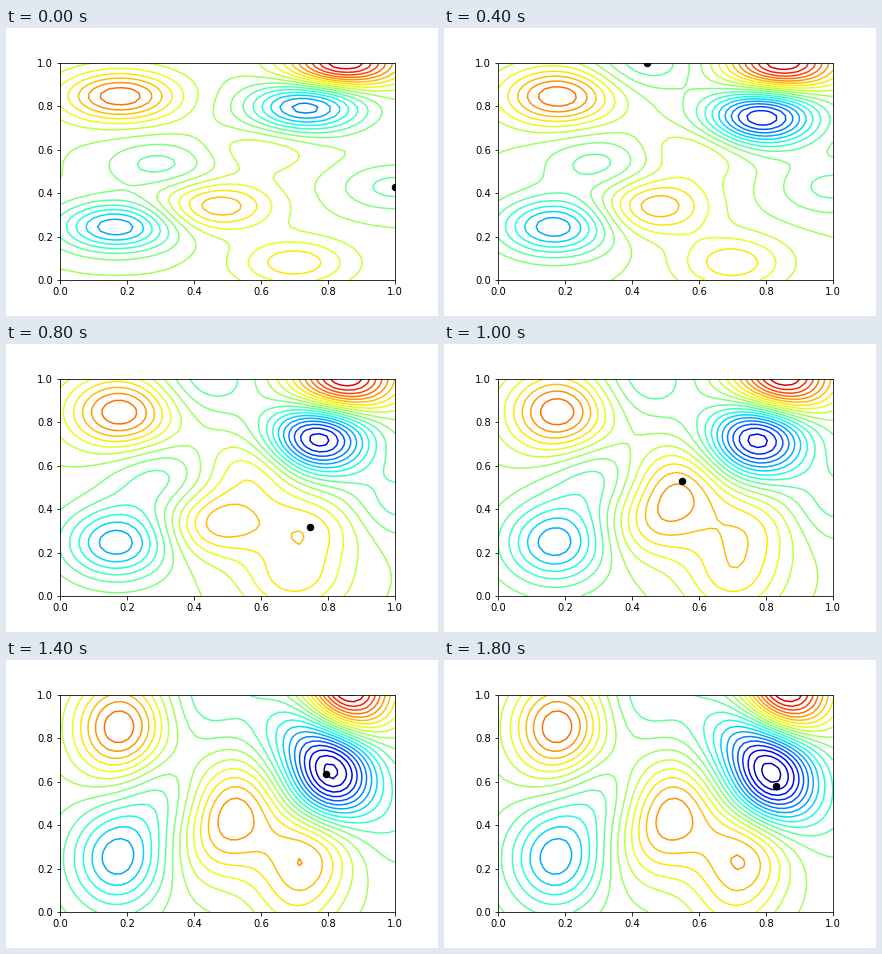
A matplotlib script for the animation above (2000 ms loop, 432x288 px).

```python
import numpy as np
import matplotlib.pyplot as plt
from matplotlib.animation import FuncAnimation

FRAMES, INTERVAL = 10, 200
LEVELS = np.linspace(-10, 10, 25)
NUGGET = 0.01

# known points (x, y, value); one more probe is added at every step
KNOWN = [(0.18, 0.845, 6.55), (0.47, 0.34, 4.7), (0.70, 0.08, 3.95),
         (0.85, 1.00, 9.2), (0.17, 0.245, -4.8), (0.30, 0.53, -1.1),
         (0.735, 0.795, -5.4), (0.60, 0.60, 2.2)]
PROBES = [(1.0, 0.428, -1.15), (0.785, 0.75, -7.4), (0.445, 1.0, -1.4),
          (0.76, 0.71, -7.8), (0.748, 0.317, 4.0), (0.55, 0.53, 4.8),
          (0.327, 0.0, 0.2), (0.795, 0.635, -9.4), (0.60, 0.98, -0.9),
          (0.83, 0.58, -8.9)]

axis = np.linspace(0, 1, 50)
X, Y = np.meshgrid(axis, axis)
GRID = np.column_stack([X.ravel(), Y.ravel()])


def kernel(a, b, scale):
    d = (a[:, None] - b[None]) / scale
    return np.exp(-0.5 * (d ** 2).sum(axis=2))


def surface(step):
    """Posterior mean of a Gaussian process after the given step."""
    data = np.array(KNOWN + PROBES[:step + 1])
    pts, vals = data[:, :2], data[:, 2]
    # the kernel grows taller and narrower until it settles
    s = min(step / 7, 1) ** 1.5
    scale = np.array([0.12 - 0.024 * s, 0.08 + 0.08 * s])
    mean = 0.95 - 0.5 * s
    cov = kernel(pts, pts, scale) + NUGGET * np.eye(len(pts))
    weights = np.linalg.solve(cov, vals - mean)
    return mean + (kernel(GRID, pts, scale) @ weights).reshape(X.shape)


fig = plt.figure(figsize=(6, 4), dpi=72, facecolor="white")
fig.subplots_adjust(left=0.125, right=0.9, bottom=0.125, top=0.88)
ax = fig.add_subplot()


def draw(step):
    ax.clear()
    ax.contour(X, Y, surface(step), levels=LEVELS, cmap="jet",
               vmin=-10, vmax=10, linewidths=1.5, linestyles="solid")
    ax.plot(*PROBES[step][:2], "ko", markersize=6.5)
    ax.set(xlim=(0, 1), ylim=(0, 1))
    return []


anim = FuncAnimation(fig, draw, frames=FRAMES, interval=INTERVAL,
                     repeat=True, repeat_delay=0)
plt.show()
```
